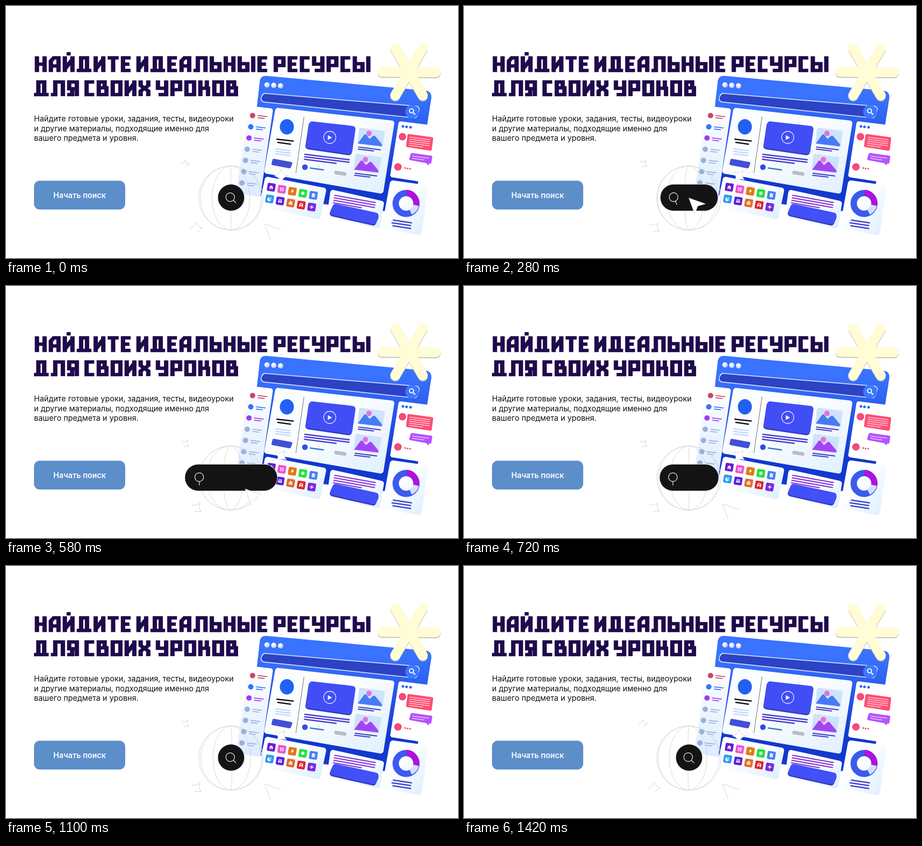
Animation of 1001x559 px, one loop 1.44 s. Source, as an HTML page:

```html
<!DOCTYPE html>
<html lang="ru">
<head>
<meta charset="utf-8">
<title>Поиск ресурсов</title>
<style>
html, body { margin: 0; width: 100%; height: 100%; overflow: hidden; background: #fff; }
svg { display: block; width: 1001px; height: 559px; font: 17.1px Inter, sans-serif; }
</style>
</head>
<body>
<svg viewBox="0 0 1001 559">
  <defs>
    <linearGradient id="win" x1="0" y1="0" x2="0" y2="1">
      <stop offset=".15" stop-color="#3973ff"/><stop offset=".75" stop-color="#1238cf"/>
    </linearGradient>
    <linearGradient id="card" x1="0" y1="0" x2="1" y2="1">
      <stop offset=".45" stop-color="#fbfdff"/><stop offset="1" stop-color="#dfefff"/>
    </linearGradient>
    <linearGradient id="side" x1="0" y1="0" x2="0" y2="1">
      <stop offset="0" stop-color="#fff"/><stop offset="1" stop-color="#dcecff"/>
    </linearGradient>
    <radialGradient id="ball" cx=".4" cy=".35">
      <stop offset=".3" stop-color="#fff"/><stop offset="1" stop-color="#c3d2f6"/>
    </radialGradient>
  </defs>
  <g id="title" fill="none" stroke="#1f0a4c" stroke-width="7.4"></g>
  <g fill="#111">
    <text x="62" y="256">Найдите готовые уроки, задания, тесты, видеоуроки</text>
    <text x="62" y="277.5">и другие материалы, подходящие именно для</text>
    <text x="62" y="299">вашего предмета и уровня.</text>
  </g>
  <rect x="62" y="387.5" width="202" height="64" rx="13" fill="#5c8ec9"/>
  <text x="163" y="426" fill="#fff" font-weight="600" text-anchor="middle">Начать поиск</text>
  <g id="scene"></g>
  <g fill="none" stroke="#d2d2d2">
    <circle cx="498" cy="426" r="71"/>
    <path id="globe"/>
  </g>
  <g id="sparks" fill="#fff" stroke="#d0d0d0"></g>
  <rect id="pill" y="395.5" height="59" rx="29.5" fill="#141414" stroke="#ddd"/>
  <g id="lens" fill="none" stroke="#fff" stroke-width="1.3"><circle r="9.7"/><path d="M7 7L13 13"/></g>
  <g id="cursor">
    <path d="M0 0L37 13L20 18L13 35Z" fill="#fff"/>
    <path d="M37 13L0 0L13 35" fill="none" stroke="#d0d0d0"/>
  </g>
</svg>
<script>
const $ = id => document.getElementById(id);

// Display lettering: [centre-line width, strokes]
const stem = x => `M${x}-3.5V31.5`;
const slant = stem(0) + stem(13) + 'M0 25L13 3';
const soft = 'M0-3.5V28H13V13H0';
const glyphs = {
  Н: [13, stem(0) + stem(13) + 'M0 14H13'],
  А: [13, 'M0 31.5V7L5 0H13V31.5M0 18H13'],
  И: [13, slant],
  Й: [13, slant + 'M3-9H10'],
  Д: [18, 'M4 28V0H14V28M-3.5 28H21.5'],
  Т: [12, 'M-3.5 0H15.5M6 0V31.5'],
  Е: [10, 'M13 0H0V28H13M0 14H11'],
  Л: [17, 'M-3.5 28H4V0H17V31.5'],
  Ь: [13, soft],
  Ы: [23, soft + stem(23)],
  Р: [13, 'M0 31.5V0H13V17H0'],
  С: [10, 'M13 0H0V28H13'],
  У: [14, 'M0-3.5V14H14M14-3.5V28H1'],
  Я: [13, 'M13 31.5V0H0V15H13M5 15V28H-3.5'],
  В: [13, 'M0 0H10V13H13V28H0ZM0 13H10'],
  О: [13, 'M0 0H13V28H0Z'],
  Х: [13, 'M0-3.5V8L13 20V31.5M13-3.5V8L0 20V31.5'],
  К: [13, stem(0) + 'M11-3.5V14M0 14H13V31.5']
};

function word(x, y, text) {
  let out = `<text x="${x}" y="${y + 31}" font-size="34" fill="none" stroke="none">${text}</text>`;
  for (const ch of text) {
    const [w, d] = glyphs[ch];
    out += `<path transform="translate(${x + 4.5} ${y}) scale(1.3 1)" d="${d}"/>`;
    x += (w + 7) * 1.3 + 4.9;
  }
  return out;
}
$('title').innerHTML =
  word(64, 115, 'НАЙДИТЕ') + word(289, 115, 'ИДЕАЛЬНЫЕ') + word(593, 115, 'РЕСУРСЫ') +
  word(62, 168.5, 'ДЛЯ') + word(174, 168.5, 'СВОИХ') + word(332, 168.5, 'УРОКОВ');

// Rounded quadrilateral; corners clockwise from the top left
function quad(s, fill, r = 4) {
  const inner = s.split(' ').map((q, i) => {
    const [x, y] = q.split(',').map(Number);
    return [x + (i % 3 ? -r : r), y + (i < 2 ? r : -r)];
  });
  return `<polygon points="${inner.join(' ')}" fill="${fill}" stroke="${fill}" stroke-width="${2 * r}" stroke-linejoin="round"/>`;
}
const dot = (x, y, r, fill) => `<circle cx="${x}" cy="${y}" r="${r}" fill="${fill}"/>`;
const path = (d, fill, more = '') => `<path d="${d}" fill="${fill}" ${more}/>`;
const bar = (x, y, dx, dy, color, w = 3) =>
  path(`M${x} ${y}l${dx} ${dy}`, 'none', `stroke="${color}" stroke-width="${w}" stroke-linecap="round"`);
const each = (list, fn) => list.map(fn).join('');

function frame() {
  return path('M577 155L928 187.500Q943 189 942 204L912 395L838 455L716 441L560 420L555 228L562 167Q564 154 577 155Z', 'url(#win)') +
    each([578, 593, 608], (x, i) => dot(x, 175 + i, 6, 'url(#ball)')) +
    quad('566,193 916,221 912,249 564,214', '#d3dcfa', 8) +
    quad('568,195 914,223 910,247 566,212', '#2b43c4', 7) +
    dot(899, 234.5, 15, '#3c78ff') +
    path('M902 237l4 4', 'none', 'stroke="#fff" stroke-width="2.5"') +
    `<circle cx="898" cy="232.500" r="4.500" fill="none" stroke="#fff" stroke-width="2.200"/>`;
}

function sidebar() {
  const colors = ['#c94561', '#3772fa', '#a03bf3', '#9aafdb', '#9aafdb', '#9aafdb', '#9aafdb'];
  return quad('538,222 591,227 564,423 510,415', 'url(#side)', 5) +
    each(colors, (c, i) => {
      const x = 546 - 3.9 * i, y = 243 + 24.9 * i;
      return dot(x, y, 6, c) + bar(x + 12, y, 20, 2.5, c, 2) + bar(x + 12, y + 5, 14, 1.5, c, 2);
    });
}

function picture(x, y, color) {
  return `<g transform="translate(${x} ${y})">` + quad('4,0 61,7 56,43 0,36', '#cfe2fb', 3) +
    path('M1 35L15 16Q18 13 21 17L27 25L34 19Q37 16 40 19L54 36Q57 41 52 41Z', color) +
    dot(26, 12.5, 6, '#e46fe0') + bar(3, 43, 48, 6, '#4840cd', 2.5) + bar(2, 47.5, 34, 4, '#4840cd', 2.5) + '</g>';
}

function mainCard() {
  return quad('596,226 860,254 836,416 572,372', 'url(#card)', 6) +
    `<ellipse cx="622" cy="268" rx="15.500" ry="17" fill="#2161f4"/>` +
    bar(600, 295.5, 36, 4, '#17171d') + bar(602, 302.5, 28, 4, '#17171d') +
    each([317, 322.5, 328], y => bar(597.5, y, 32, 4, '#bad5ff', 2.5)) +
    quad('590,339 634,346 631,360 588,353', '#414fd7', 3) +
    path('M660 246L642 370', 'none', 'stroke="#555"') +
    quad('670,258 773,268 766,331 663,318', '#323bc5', 7) +
    quad('671,256 774,266 767,328 664,315', '#414ef6', 7) +
    `<circle cx="717" cy="291.500" r="13.500" fill="none" stroke="#fff" stroke-width="1.300"/>` +
    path('M713 286.5L722 292L712.5 297Z', '#fff') +
    bar(662, 329, 98, 12, '#4a40d2') + bar(661.5, 334.5, 98, 12, '#4a40d2') + bar(661, 340, 70, 9, '#4a40d2') +
    dot(662, 357.5, 6.3, '#2c50e2') + bar(674, 359.5, 29, 4, '#3d79d2') +
    bar(731, 369.5, 19, 3, '#b8bcc6', 8) +
    picture(778, 270, '#477af5') + picture(770, 328, '#a344f4');
}

function chat() {
  return quad('869,256 960,266 938,392 851,380', '#fff', 5) +
    each([879, 887, 896], (x, i) => dot(x, 267 + i, 3, '#2f6cf5')) +
    dot(878, 290, 8.3, '#f14b77') + dot(868, 357, 8.3, '#f14b77') +
    quad('889,284 946,291 943,321 886,313', '#ff4d72', 3) +
    each([291, 295.5, 300, 304.5], (y, i) => bar(895 - i / 2, y, 44, 5.5, '#ffd9e1', 1.6)) + bar(893, 309, 30, 4, '#ffd9e1', 1.6) +
    quad('896,326 944,332 942,350 893,342', '#b552ff', 3) + path('M928 346L936 354L937 345Z', '#b552ff') +
    bar(901, 333, 35, 4.5, '#eed8ff', 1.6) + bar(900, 338, 26, 3.5, '#eed8ff', 1.6) +
    each([884, 889.5, 895], (x, i) => dot(x, 359.5 + i * .8, 1.9, '#f14b77'));
}

function apps() {
  const icons = [
    ['#681fd2', 'M-5 0L0-5L5 0H4V5H1V1H-1V5H-4V0Z'],
    ['#ee52d4', 'M-5-3H-1V0H-5ZM1-3H5V0H1ZM-4 1H-1V5H-4ZM1 1H4V5H1ZM-3-5L0-3L3-5V-3H-3Z'],
    ['#e27913', 'M1-6L-4 1H-1L-2 6L4-2H1Z'],
    ['#20e638', 'M0-6L1-3L4-4L3-1L6 0L3 1L4 4L1 3L0 6L-1 3L-4 4L-3 1L-6 0L-3-1L-4-4L-1-3Z'],
    ['#487ff0', 'M-4-5H2L4-3V5H-4ZM-2-1V0H2V-1ZM-2 2V3H2V2Z'],
    ['#2d99f3', 'M-1-4V1H4A5 5 0 1 1-1-4ZM1-5A5 5 0 0 1 5-1H1Z'],
    ['#5922df', 'M-5-4H5L0 0ZM-5-2L0 2L5-2V4H-5Z'],
    ['#e26d2a', 'M-5-2H-2V-5H2V-2H5V0H-5ZM-5 1H5V4H-5Z'],
    ['#e02525', 'M-5 5V-1L-3-5H3L5-1V5H2V2H-2V5ZM-2-3V0H2V-3Z'],
    ['#7929e0', 'M-1-5H1V-1H5V1H1V5H-1V1H-5V-1H-1Z']
  ];
  return quad('573,379 709,403 697,473 561,446', 'url(#card)', 6) +
    each(icons, ([color, d], i) => {
      const col = i % 5, row = i < 5 ? 0 : 1;
      return `<g transform="translate(${587.5 + col * 23.3 - row * 3.7} ${402 + col * 4.5 + row * 26}) rotate(9)">` +
        `<rect x="-9" y="-9" width="18" height="18" rx="3" fill="${color}"/>${path(d, '#fff', 'fill-rule="evenodd" transform="scale(.85)"')}</g>`;
    });
}

function bottomCards() {
  const arc = (d, c) => path(d, 'none', `stroke="${c}" stroke-width="13"`);
  return quad('718,408 837,432 829,493 711,469', 'url(#card)', 6) +
    each([420, 425.5, 431], (y, i) => bar(728 - i, y, 90, 16, '#8438d8', 2.7)) + bar(725, 436.5, 62, 11, '#8438d8', 2.7) +
    quad('722,442 825,461 820,487 717,467', '#333fc0', 7) +
    quad('723,439 825,458 821,484 718,464', '#4150f7', 7) +
    quad('850,387 934,397 921,508 833,494', 'url(#card)', 7) +
    `<circle cx="886" cy="438" r="23" fill="none" stroke="#3b5bef" stroke-width="14"/>` +
    arc('M887 414A23 23 0 0 1 908 442', '#b111df') + arc('M908 442A23 23 0 0 1 896 457', '#d8dcf7') +
    bar(858, 475, 40, 6, '#4149cd') + bar(855, 481, 41, 6, '#4149cd') + bar(857, 487.5, 39, 6, '#4149cd');
}

function asterisk() {
  const d = 'M833 146L952 147M862 94L923 198M923 94L862 198';
  const arm = 'stroke-width="22" stroke-linecap="round"';
  return path(d, 'none', `stroke="#c9cbb9" transform="translate(0 2.500)" ${arm}`) +
    path(d, 'none', `stroke="#fffcd6" ${arm}`);
}

$('scene').innerHTML = frame() + sidebar() + mainCard() + chat() + apps() + bottomCards() + asterisk();

// Eased value through [time, value] keys
function tween(t, ...keys) {
  const n = keys.findIndex(k => k[0] > t);
  if (n === 0) return keys[0][1];
  if (n < 0) return keys[keys.length - 1][1];
  const [t0, a] = keys[n - 1], [t1, b] = keys[n];
  const p = (t - t0) / (t1 - t0);
  return a + (b - a) * p * p * (3 - 2 * p);
}

// Four-pointed spark whose outline fades out on one side
function star(x, y, r, turn) {
  const q = r * .2;
  return `<path transform="translate(${x} ${y}) rotate(${turn})" pathLength="100" stroke-dasharray="70 30" ` +
    `d="M${-r} 0Q${-q} ${-q} 0 ${-r}Q${q} ${-q} ${r} 0Q${q} ${q} 0 ${r}Q${-q} ${q} ${-r} 0"/>`;
}

function meridians(t) {
  let d = '';
  for (let a = -108 + t / 360 % 1 * 36; a < 90; a += 36) {
    if (a <= -90) continue;
    const rx = 71 * Math.sin(a * Math.PI / 180);
    d += `M498 355A${Math.abs(rx)} 71 0 0 ${rx > 0 ? 1 : 0} 498 497`;
  }
  return d;
}

function draw(now) {
  const t = now % 1440;
  const half = tween(t, [180, 29.5], [390, 102.5], [600, 102.5], [840, 29.5]);
  const left = 498.5 - half;
  const turn = tween(t, [180, 0], [390, 45], [890, 45], [1080, 0]);
  const trip = tween(t, [10, 0], [140, 1], [500, 1], [680, 0]);
  const spin = tween(t, [20, 0], [130, 36], [760, 36], [860, 0], [930, 0], [1040, 36], [1290, 36], [1400, 0]);

  $('globe').setAttribute('d', meridians(t));
  $('sparks').innerHTML = star(396.5, 350.5, 10, spin) + star(609, 377, 15, spin) + star(421.5, 493, 14, spin);
  $('pill').setAttribute('x', left);
  $('pill').setAttribute('width', half * 2);
  $('lens').setAttribute('transform', `translate(${left + 27.5 + (half - 29.5) * .06} 424) rotate(${turn})`);
  $('cursor').setAttribute('transform', `translate(${572.5 - 74.5 * trip} ${483 - 57 * trip})`);
  requestAnimationFrame(draw);
}
requestAnimationFrame(draw);
</script>
</body>
</html>
```
